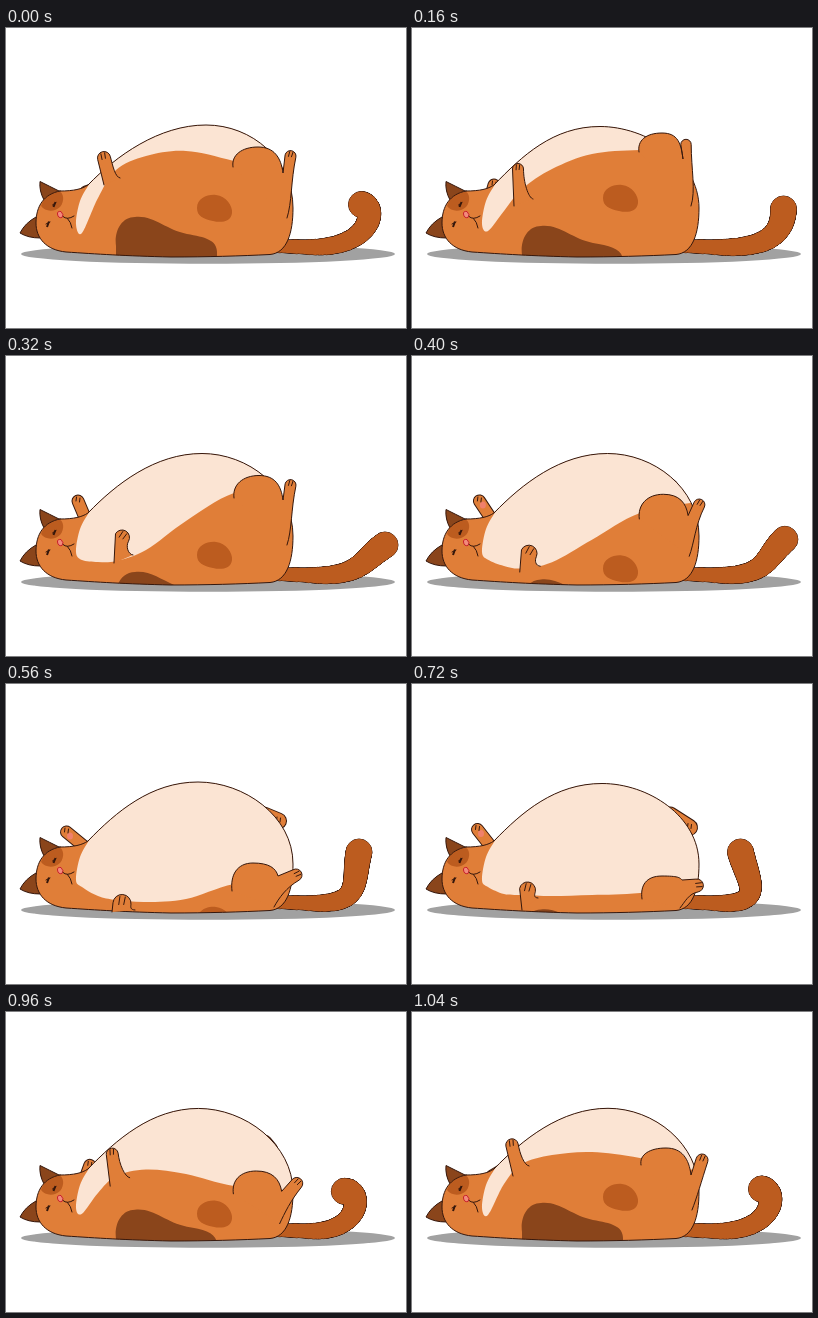
These frames come from a looping animation (400 px wide and 300 px high, 1120 ms). An HTML page:

```html
<!DOCTYPE html>
<html lang="en">
<head>
<meta charset="utf-8">
<title>Lazy cat</title>
<style>
  html, body { margin: 0; width: 100%; height: 100%; overflow: hidden; background: #fff; }
  svg { display: block; width: 100%; height: 100%; }
  .line { fill: none; stroke: #35170c; stroke-width: 1; stroke-linecap: round; stroke-linejoin: round; }
  .fur { fill: #e07e38; }
  .mid { fill: #bc5c1f; }
  .dark { fill: #8a451b; }
  .cream { fill: #fbe4d3; }
</style>
</head>
<body>
<svg viewBox="0 0 400 300">
  <defs><clipPath id="inside"><path id="clipShape"/></clipPath></defs>
  <ellipse cx="202" cy="226" rx="187" ry="9.8" fill="#a1a1a1"/>
  <path id="tailEdge" fill="#35170c" stroke="#35170c" stroke-width="1"/>
  <path id="tailFill" class="mid"/>
  <g id="farLeg"></g>
  <g id="farArm"></g>
  <path class="line" style="fill:#8a451b" d="M38 172Q33 163 34 153.500Q43 158 53 163ZM30 189Q19 195 14 205Q22 210 34 210Z"/>
  <path id="body" class="fur"/>
  <g clip-path="url(#inside)">
    <path id="patch" class="dark" d="M110 240V218C108 204 115 189 129 189C148 187 160 202 181 206C199 209 211 212 211 224V240Z"/>
    <path id="spot" class="mid" d="M191 180C191 170 202 166 210 167C220 168 227 178 226 185C225 194 215 195 207 193C197 191 191 188 191 180Z"/>
    <path id="belly" class="cream"/>
    <path class="mid" d="M35 178C38 169 45 163 52 163C58 164 59 173 54 179C49 184 39 184 35 178Z"/>
  </g>
  <path id="outline" class="line"/>
  <path id="legFill" class="fur"/>
  <path id="legLine" class="line"/>
  <path id="armFill" class="fur"/>
  <path id="armLine" class="line"/>
  <path class="line" style="stroke-width:2;stroke-linecap:butt" d="M47.500 179L49.500 174M41 199L43 193.500"/>
  <path class="line" d="M46.500 177L50 174.500M40 196L44 194"/>
  <path d="M51.500 186Q51 183 55 183.500Q58.500 187 56 189.500Q52 190.500 51.500 186Z" fill="#f28a7c" stroke="#c8202c"/>
  <path class="line" d="M57 188.500Q61 192.500 68 188M61.500 190.500Q65 194 66 200"/>
</svg>
<script>
const STEP = 80, STEPS = 14;
const KEY_STEPS = [0, 2, 4, 7, 9, 11, 13];

// Each row is one key pose.
const TORSO = [ // crown x, y, dark patch shift, spot shift
  [200, 97, 0, 0], [188, 98.5, 9, -10], [196, 97.5, 27, 19], [192, 98, 45, 56],
  [190, 99.5, 36.5, 63], [190, 97, 17, 39], [196, 96.3, 2, 5]];
const BELLY_X = [76, 92, 110, 140, 180, 228, 290];
const BELLY = [ // lower edge heights at BELLY_X
  [205, 170, 142, 128, 123, 133, 150], [203, 183, 161, 141, 126, 122, 122],
  [204, 206, 205, 194, 165, 137, 125], [203, 212, 216, 218, 215, 200, 192],
  [203, 210, 211, 212, 211, 209, 200], [201, 191, 178, 173, 183, 199, 195],
  [203, 172, 152, 143, 140, 146, 160]];
const TAIL = [ // bezier handles and tip
  [365, 372, 180, 355.5, 176.5], [357, 371, 205, 371.5, 181], [355, 355, 205, 379, 189],
  [358, 346, 200, 353, 168], [356, 337, 200, 328.5, 168], [350, 348, 180, 329, 180],
  [362, 367, 180, 349.5, 177]];
const THIGH = [ // start, top, knee
  [227, 139, 252, 119, 277, 145], [227, 124, 250, 105, 271, 131], [228, 142, 253, 119.5, 277, 144],
  [226, 207, 247, 179, 272, 192], [230, 215, 250, 192, 270, 196], [226, 207, 247, 179, 272, 192],
  [229, 153, 254, 136, 279, 163]];
const FOOT = [ // centre, radius, angle, end
  [284.5, 128, 5.5, -78, 281, 190], [274, 116.5, 5.2, -90, 279, 178], [284.5, 129, 5.5, -78, 281, 189],
  [290, 191, 6, -30, 268, 223], [285, 201.5, 6.5, -10, 268, 224], [290, 191, 6, -30, 268, 223],
  [290, 148, 6, -72, 280, 198]];
const ARM = [ // start, centre, radius, angle, end
  [98, 157, 98, 130, 6.5, -105, 114, 150], [102, 178, 106, 141, 5.5, -90, 121, 171],
  [108, 207, 116, 181.5, 7.5, -60, 127, 199], [106, 228, 116, 219.5, 9, -85, 129, 226],
  [110, 226, 115.5, 206, 8, -80, 126, 214], [107, 187, 112, 155.5, 6, -92, 129, 180],
  [101, 164, 100, 133, 6.2, -100, 117, 154]];
const FAR = [ // far leg tip, far arm tip
  [255, 140, 92, 160], [255, 140, 82, 157], [255, 140, 72, 145], [272.5, 137, 60.5, 148],
  [277.5, 143.5, 65.5, 145.5], [272.5, 137, 77, 149], [255, 140, 90, 158]];

const el = id => document.getElementById(id);
const set = (id, d) => el(id).setAttribute("d", d);
const fix = (...v) => v.map(n => n.toFixed(2)).join(" ");

// Cyclic Hermite interpolation of the key poses
function pose(keys, step) {
  const count = keys.length;
  const i = KEY_STEPS.findLastIndex(k => k <= step);
  const row = j => keys[(j + count) % count];
  const when = j => KEY_STEPS[(j + count) % count] + STEPS * Math.floor(j / count);
  const span = when(i + 1) - when(i), s = (step - when(i)) / span;
  return row(i).map((a, c) => {
    const b = row(i + 1)[c];
    const slope = j => (row(j + 1)[c] - row(j - 1)[c]) / (when(j + 1) - when(j - 1)) * span;
    return a + s * (slope(i) + s * (3 * (b - a) - 2 * slope(i) - slope(i + 1)
      + s * (2 * (a - b) + slope(i) + slope(i + 1))));
  });
}

function spline(points) {
  let d = "M" + fix(...points[0]);
  for (let i = 0; i < points.length - 1; i++) {
    const a = points[i], b = points[i + 1];
    const before = points[i - 1] || a, after = points[i + 2] || b;
    d += "C" + fix(a[0] + (b[0] - before[0]) / 6, a[1] + (b[1] - before[1]) / 6,
      b[0] - (after[0] - a[0]) / 6, b[1] - (after[1] - a[1]) / 6, ...b);
  }
  return d;
}

// Continues a path round a paw and on to its end point
function paw(x, y, r, degrees, ex, ey, bendX, bendY) {
  const angle = degrees * Math.PI / 180, ux = Math.cos(angle), uy = Math.sin(angle);
  const bx = x - uy * r, by = y + ux * r;
  const reach = Math.hypot(ex - bx, ey - by);
  const at = (along, side) => fix(x + ux * along + uy * side, y + uy * along - ux * side);
  return {
    edge: `L${at(0, r)}A${fix(r, r)} 0 0 1 ${fix(bx, by)}C` +
      fix(bx - ux * reach * .4, by - uy * reach * .4, ex + bendX, ey + bendY * reach, ex, ey),
    toes: `M${at(r * .75, r * .3)}L${at(-r * .15, r * .35)}M${at(r * .75, -r * .3)}L${at(-r * .1, -r * .2)}`
  };
}

function farLimb(id, bx, by, x, y, r, pad) {
  const bone = `M${fix(bx, by)}L${fix(x, y)}`;
  const stroke = (color, width) =>
    `<path d="${bone}" stroke="${color}" stroke-width="${width}" stroke-linecap="round"/>`;
  el(id).innerHTML = stroke("#35170c", 2 * r + 1) + stroke("#e07e38", 2 * r - 1) +
    (pad ? `<ellipse cx="${x + 3.5}" cy="${y + 4}" rx="3" ry="3.500" fill="#f0806c"/>` : "") +
    `<path class="line" d="M${fix(x - 1.5, y - 4)}l-.5 4M${fix(x + 2, y - 3)}l-.5 4"/>`;
}

function drawTail([c1x, c2x, c2y, tx, ty]) {
  let d = "";
  const blob = (x, y, r) => { d += `M${fix(x - r, y)}a${fix(r, r)} 0 1 1 ${fix(2 * r)} 0a${fix(r, r)} 0 1 1 ${fix(-2 * r)} 0`; };
  for (let x = 266; x < 300; x++) blob(x, 218 + (x - 266) / 34, 6 + (x - 266) / 34);
  for (let i = 0; i <= 120; i++) {
    const t = i / 120, q = 1 - t;
    const mix = (a, b, c, e) => q * q * q * a + 3 * q * q * t * b + 3 * q * t * t * c + t * t * t * e;
    blob(mix(300, c1x, c2x, tx), mix(219, 222, c2y, ty), 7 + 6 * Math.pow(t, .8));
  }
  set("tailEdge", d);
  set("tailFill", d);
}

function draw(step) {
  const [cx, cy, patchY, spotY] = pose(TORSO, step);
  const body = `M54 163C68 163 76 161 82 157C110 128 ${fix(cx - 47, cy, cx, cy)}C${fix(cx + 46, cy)} 287 132 287 180` +
    "C287 205 281 225 264 226.500C235 228 200 229 165 229C120 228 90 226 60 224C40 222 30 210 30 195C30 178 38 166 54 163Z";
  for (const id of ["body", "outline", "clipShape"]) set(id, body);
  el("patch").setAttribute("transform", `translate(0 ${patchY})`);
  el("spot").setAttribute("transform", `translate(0 ${spotY})`);

  const lower = pose(BELLY, step).map((y, i) => [BELLY_X[i], y]);
  set("belly", spline([[84, 155], [74, 173], [70, 196], ...lower]) + "V80H84Z");

  drawTail(pose(TAIL, step));

  const [sx, sy, tx, ty, kx, ky] = pose(THIGH, step);
  const foot = paw(...pose(FOOT, step), 5, -.25);
  const leg = `M${fix(sx, sy)}C${fix(sx - 2, (sy + ty) / 2 - 2, tx - 16, ty, tx, ty)}` +
    `C${fix(tx + 16, ty, kx - 2, ty + .4 * (ky - ty), kx, ky)}` + foot.edge;
  set("legFill", leg + "Z");
  set("legLine", leg + (step === 2 ? "" : foot.toes));

  const [ax, ay, ...hand] = pose(ARM, step);
  const palm = paw(...hand, -5, -.03);
  const arm = `M${fix(ax, ay)}` + palm.edge;
  set("armFill", arm + "Z");
  set("armLine", arm + palm.toes);

  const [fx, fy, gx, gy] = pose(FAR, step);
  farLimb("farLeg", 258, 131, fx, fy, 8, false);
  farLimb("farArm", 80, 164, gx, gy, 6, gx < 69);
}

const start = performance.now();
let shown = -1;
function tick() {
  const step = Math.floor((performance.now() - start) / STEP) % STEPS;
  if (step !== shown) draw(shown = step);
  requestAnimationFrame(tick);
}
tick();
</script>
</body>
</html>
```
